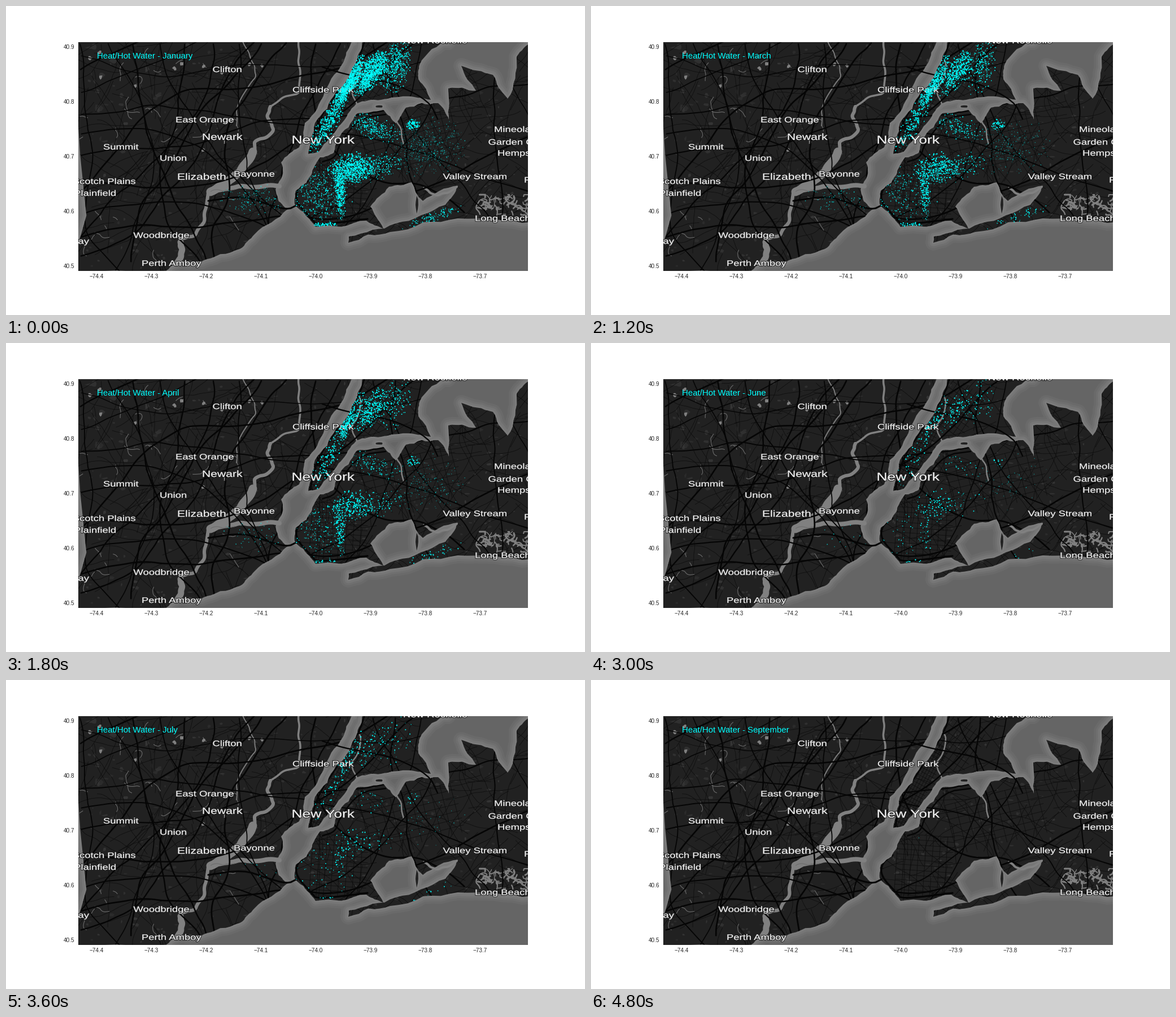
Animation of 1025 by 547 pixels, one loop 5400 ms. Source, as a matplotlib script:

```python
import math

import numpy as np
import matplotlib.pyplot as plt
from matplotlib.animation import FuncAnimation
from matplotlib.collections import LineCollection, PolyCollection
from matplotlib.patches import PathPatch, Polygon, Rectangle
from matplotlib.path import Path
from matplotlib.textpath import TextPath
from matplotlib.transforms import Affine2D

W, H = 1025, 547
LEFT, TOP, RIGHT, BOTTOM = 128, 64, 924, 469
PT = 0.72  # points per pixel at 100 dpi
LAND, WATER, DEEP, CYAN = "#212121", "#808080", "#656565", "#00ffff"
# A Mercator map drawn on an even degree grid becomes this much wider.
STRETCH = 1 / math.cos(math.radians(40.7))

rng = np.random.default_rng(11)
fig = plt.figure(figsize=(W / 100, H / 100), dpi=100, facecolor="white")
ax = fig.add_axes([0, 0, 1, 1])
ax.set(xlim=(0, W), ylim=(H, 0))
ax.axis("off")

frame = Rectangle((LEFT, TOP), RIGHT - LEFT, BOTTOM - TOP, fc=DEEP, lw=0, zorder=0)
ax.add_patch(frame)


def rough(points, amount=0.08, closed=True, levels=3):
    """Break each edge at a shifted midpoint to make a natural shore."""
    p = np.array(points, float)
    for _ in range(levels):
        d = np.roll(p, -1, axis=0) - p
        shift = rng.uniform(-amount, amount, (len(p), 1))
        mid = p + d / 2 + np.c_[-d[:, 1], d[:, 0]] * shift
        p = np.stack([p, mid], 1).reshape(-1, 2)
        p = p if closed else p[:-1]
    return p


def smooth(points, levels=2):
    """Round an open line by cutting its corners."""
    p = np.array(points, float)
    for _ in range(levels):
        a, b = p[:-1], p[1:]
        cut = np.stack([0.75 * a + 0.25 * b, 0.25 * a + 0.75 * b], 1).reshape(-1, 2)
        p = np.vstack([p[:1], cut, p[-1:]])
    return p


def wander(x, y, angle, length, turn, step=8):
    a = angle + np.cumsum(rng.normal(0, turn, max(3, int(length / step))))
    return smooth(np.c_[x + step * np.cumsum(np.cos(a)), y + step * np.cumsum(np.sin(a))], 1)


def blob(x, y, rx, ry, n=8):
    t = np.linspace(0, 2 * np.pi, n, endpoint=False)
    r = rng.uniform(0.5, 1.15, n)
    return np.c_[x + rx * r * np.cos(t), y + ry * r * np.sin(t)]


def line(points, width, color, z):
    art, = ax.plot(*np.transpose(points), color=color, lw=width * PT, zorder=z,
                   solid_capstyle="round", solid_joinstyle="round")
    art.set_clip_path(frame)
    return art


def stream(width, *points):
    line(smooth(rough(points, 0.12, closed=False, levels=2)), width, WATER, 5)


def road(width, points, bridge=False):
    art = line(smooth(points), width, "#050505", 6)
    if not bridge:
        art.set_clip_path(ground, ax.transData)


# Key points of the shores, in stage pixels
jersey = [(120, 55), (615, 55), (600, 92), (564, 152), (529, 207), (519, 250), (487, 277),
          (490, 297), (478, 318), (483, 346), (498, 360), (440, 404), (414, 430), (346, 452),
          (305, 452), (268, 475), (120, 475)]
bronx = [(634, 55), (622, 94), (584, 152), (547, 207), (535, 262), (553, 258), (573, 233),
         (592, 210), (620, 173), (664, 166), (716, 160), (752, 166), (730, 130), (732, 104),
         (782, 55)]
island = [(546, 284), (532, 313), (513, 327), (511, 350), (540, 381), (548, 391), (638, 380),
          (668, 394), (645, 355), (678, 320), (718, 312), (738, 345), (800, 318), (778, 352),
          (690, 385), (607, 408), (606, 419), (680, 400), (800, 376), (930, 383), (930, 60),
          (904, 90), (888, 164), (862, 122), (806, 106), (832, 150), (783, 146), (784, 201),
          (765, 172), (708, 180), (690, 208), (668, 184), (622, 190), (586, 236), (580, 260),
          (556, 268)]
shores = [np.clip(rough(s), (LEFT, TOP), (RIGHT, BOTTOM)) for s in (jersey, bronx, island)]
lands = shores + [blob(660, 178, 9, 3), blob(727, 352, 4, 15)]

# Water grows lighter towards the shore.
for width, tone in ((28, "#6a6a6a"), (20, "#6f6f6f"), (13, "#767676"), (6, "#7c7c7c")):
    for land in lands:
        ax.add_patch(Polygon(land, fc="none", ec=tone, lw=width * PT, joinstyle="round",
                             zorder=1)).set_clip_path(frame)
for land in lands:
    ax.add_patch(Polygon(land, fc=LAND, lw=0, zorder=2)).set_clip_path(frame)

paths = [Path(s) for s in shores]
ground = Path.make_compound_path(*[Path(np.vstack([s, s[:1]]), closed=True) for s in shores])


def on_land(collection):
    ax.add_collection(collection, autolim=False)
    collection.set_clip_path(ground, ax.transData)


# Parks, larger towards the hills in the north-west
parks = []
for _ in range(480):
    x, y = rng.uniform(LEFT, RIGHT), rng.uniform(TOP, BOTTOM)
    size = 4 + 6 * max(0, 1 - math.hypot(x - LEFT, y - TOP) / 250)
    parks.append(blob(x, y, rng.uniform(1.5, size * 1.4), rng.uniform(1, size), 6))
on_land(PolyCollection(parks, fc=["#343434", "#2b2b2b", "#303030"], lw=0, zorder=3))

# Minor streets wander in the suburbs and form tilted grids in the city.
streets = []
for _ in range(330):
    x, y = rng.uniform(LEFT - 20, RIGHT), rng.uniform(TOP - 20, BOTTOM)
    heading = rng.choice([0.35, 1.0, 1.9, 2.6, -0.5]) + rng.normal(0, 0.25)
    streets.append(wander(x, y, heading, rng.uniform(50, 170), 0.14))


def grid(cx, cy, w, h, degrees, step):
    turn = Affine2D().rotate_deg(degrees).translate(cx, cy)
    for t in np.arange(-h / 2, h / 2, step):
        streets.append(turn.transform([(-w / 2, t), (w / 2, t)]))
    for t in np.arange(-w / 2, w / 2, 1.4 * step):
        streets.append(turn.transform([(t, -h / 2), (t, h / 2)]))


grid(580, 190, 170, 34, -62, 5)
grid(650, 115, 85, 70, -55, 9)
grid(590, 330, 100, 110, 4, 9)
grid(720, 245, 170, 90, -14, 13)
on_land(LineCollection(streets, colors="#0a0a0a", lw=0.8 * PT, alpha=0.8, zorder=4))

# Bays, kills and rivers
stream(15, (437, 258), (414, 295), (390, 313), (362, 329))
stream(8, (362, 329), (415, 318), (484, 319))
stream(6, (358, 331), (352, 380), (335, 406), (310, 412))
stream(11, (309, 418), (312, 432), (303, 455))
stream(6, (440, 258), (440, 240), (474, 220), (462, 195), (468, 178))
stream(3.5, (468, 178), (519, 155), (517, 100), (518, 60))
stream(1.8, (418, 60), (432, 90), (443, 125), (418, 160), (408, 212))
stream(2.5, (623, 93), (628, 103), (612, 145), (621, 173))
stream(2.5, (692, 205), (700, 220), (704, 245))
stream(4, (740, 322), (764, 336), (798, 320))
creeks = [wander(rng.uniform(LEFT, 400), rng.uniform(TOP, BOTTOM), rng.uniform(0, 6.3),
                 rng.uniform(15, 60), 0.45, 5) for _ in range(26)]
on_land(LineCollection(creeks, colors="#6c6c6c", lw=1.1 * PT, zorder=5))
lakes = [blob(rng.uniform(LEFT, 460), rng.uniform(TOP, 260), 4, 4) for _ in range(12)]
on_land(PolyCollection(lakes, fc=WATER, lw=0, zorder=5))

# Salt marsh channels in the south-east
for _ in range(46):
    p = wander(rng.uniform(836, 918), rng.uniform(340, 366), rng.uniform(0, 6.3),
               rng.uniform(12, 36), 0.7, 4)
    line(np.clip(p, (832, 334), (RIGHT, 370)), rng.uniform(1.2, 3), WATER, 5)

# Highways cross the map in long bends, parkways follow the shores.
for x in np.linspace(LEFT, 880, 17):
    road(rng.uniform(1.4, 2.8), wander(x, TOP - 10, rng.uniform(1.1, 2.1), 480, 0.13, 14))
for y in np.linspace(TOP + 20, BOTTOM - 20, 11):
    road(rng.uniform(1.4, 2.8), wander(LEFT - 10, y, rng.uniform(-0.4, 0.3), 880, 0.1, 16))
road(3.2, np.array(island[1:7]) + (2, -3))
road(2.4, np.array(bronx[:5]) + (3, 0))
road(2.4, np.array(island[-5:]) + (4, 8))
road(3, [(358, 345), (420, 336), (460, 350), (498, 361), (514, 353)], bridge=True)
road(2.4, [(560, 108), (597, 120), (640, 128), (690, 138), (749, 168), (764, 200)], bridge=True)


def label(text, x, base, size=14, right=False):
    shape = TextPath((0, 0), text, size=size, prop={"family": "Liberation Sans"})
    if right:
        x -= shape.get_extents().x1 * STRETCH
    shape = shape.transformed(Affine2D().scale(STRETCH, -1).translate(x, base))
    for z, style in ((7, dict(fc="none", ec="#1c1c1c", lw=1.6)),
                     (8, dict(fc="#f0f0f0", ec="#f0f0f0", lw=0.2))):
        ax.add_patch(PathPatch(shape, zorder=z, **style)).set_clip_path(frame)


label("Clifton", 365.5, 117)
label("Cliffside Park", 507, 153)
label("East Orange", 300, 206)
label("Newark", 347, 237, 16)
label("New York", 505.5, 243.5, 20)
label("Summit", 172, 254)
label("Union", 272, 274)
label("Elizabeth", 303, 307.5, 16)
label("Bayonne", 403, 302)
label("Scotch Plains", 229, 315, right=True)
label("Plainfield", 194, 336, right=True)
label("Piscataway", 147, 421, right=True)
label("Woodbridge", 225.5, 410.5)
label("Perth Amboy", 240, 460)
label("Mineola", 864, 223)
label("Garden City", 853.5, 245.5)
label("Hempstead", 870, 265)
label("Valley Stream", 773.5, 306.5)
label("Freeport", 917, 312.5)
label("Long Beach", 830, 380.5)
label("New Rochelle", 703, 66)

# Degree scales
tick = dict(family="Liberation Sans", fontsize=10 * PT, color="#262626", va="center")
for i in range(8):
    ax.text(160.5 + 97 * i, 479.5, f"\u2212{74.4 - i / 10:.1f}", ha="center", **tick)
for i in range(5):
    ax.text(121.5, 73 + 97.1 * i, f"{40.9 - i / 10:.1f}", ha="right", **tick)


def cluster(count, x, y, along, across, tilt=0, glow=1.0):
    """Complaints around a centre, kept on city ground, with their brightness."""
    p = rng.normal(size=(count * 3, 2))
    p = p[np.hypot(*p.T) < 2.1] * (along, across)
    p = Affine2D().rotate_deg(tilt).translate(x, y).transform(p)
    west, north, east = (path.contains_points(p) for path in paths)
    p = p[north | east | (west & (p[:, 0] < 495))][:count]
    return np.c_[p, glow * rng.uniform(0.4, 1, len(p))]


pool = np.vstack([
    cluster(700, 606, 136, 27, 6, -62),             # Upper Manhattan
    cluster(400, 572, 204, 32, 8, -60),             # Lower Manhattan
    cluster(950, 644, 119, 23, 11, -52),            # West Bronx
    cluster(500, 690, 106, 26, 13, -75, 0.85),      # East Bronx
    cluster(680, 610, 288, 20, 14, -12, 0.95),      # Central Brooklyn
    cluster(330, 591, 325, 26, 5, 85),              # Flatbush
    cluster(420, 552, 335, 30, 26, 0, 0.75),        # South-west Brooklyn
    cluster(60, 562, 387, 14, 2),                   # Coney Island
    cluster(300, 652, 286, 26, 12, -15, 0.8),       # East New York
    cluster(330, 650, 215, 25, 10, 20, 0.8),        # North-west Queens
    cluster(90, 720, 210, 6, 5),                    # Flushing
    cluster(480, 745, 250, 34, 26, -12, 0.5),       # Queens
    cluster(110, 755, 374, 28, 5, -20, 0.8),        # Rockaway
    cluster(150, 440, 342, 30, 14, 0, 0.6),         # Staten Island
])

months = {"January": 1, "February": 0.82, "March": 0.5, "April": 0.36, "May": 0.14,
          "June": 0.1, "July": 0.085, "August": 0.075, "September": 0}


def pick(share):
    """A month's share of the pool; the last month has a single complaint."""
    if share:
        chosen = pool[rng.choice(len(pool), int(len(pool) * share), replace=False)]
    else:
        chosen = np.array([[579.5, 278.5, 0.4]])
    glow = chosen[:, 2]
    tint = np.c_[0 * glow, 0 * glow + 1, 0 * glow + 1, np.clip(glow * 1.3, 0, 1)]
    return chosen[:, :2], ((0.8 + 1.6 * glow) * PT) ** 2, tint


scenes = [(name, *pick(share)) for name, share in months.items()]
dots = ax.scatter([], [], lw=0, zorder=9)
dots.set_clip_path(frame)
title = ax.text(161, 93, "", color=CYAN, family="Liberation Sans", fontsize=15 * PT, zorder=10)


def draw(i):
    name, places, sizes, tints = scenes[i]
    dots.set_offsets(places)
    dots.set_sizes(sizes)
    dots.set_facecolors(tints)
    title.set_text(f"Heat/Hot Water - {name}")
    return dots, title


anim = FuncAnimation(fig, draw, frames=len(scenes), interval=600, repeat=True, repeat_delay=0)
plt.show()
```
